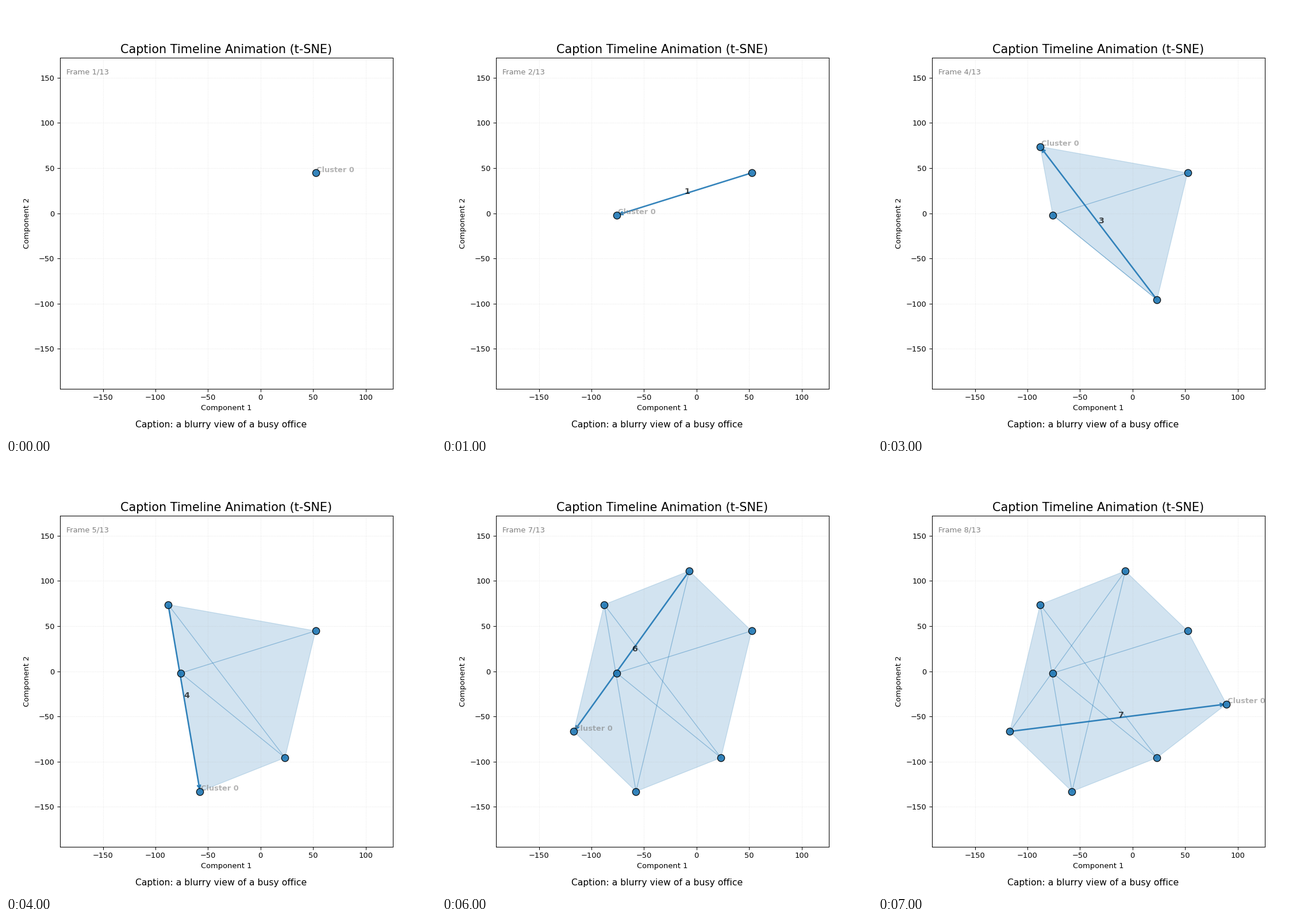
Recreate the animation shown at these times as a matplotlib script. Size 748 px wide and 748 px high, loop 8000 ms.

```python
import matplotlib.pyplot as plt
from matplotlib.animation import FuncAnimation

BLUE = "#1f77b4"
TOTAL = 13
POINTS = [
    (52.4, 44.6), (-75.9, -2.0), (23.3, -95.6), (-87.9, 73.7),
    (-57.6, -132.9), (-6.9, 110.9), (-116.8, -66.6), (89.4, -36.3),
]

plt.rcParams["font.family"] = "DejaVu Sans"
fig, ax = plt.subplots(figsize=(8, 8), dpi=93.5)
ax.set_xlim(-191.1, 126.1)
ax.set_ylim(-194, 172.1)
ax.set_title("Caption Timeline Animation (t-SNE)", fontsize=16)
ax.set_xlabel("Component 1")
ax.set_ylabel("Component 2")
ax.grid(True, linestyle=":", alpha=0.3)
fig.text(0.5, 0.02, "Caption: a blurry view of a busy office",
         ha="center", fontsize=12)
counter = ax.text(0.02, 0.95, "", transform=ax.transAxes,
                  fontsize=10, color="gray")
layer = []


def half_hull(points):
    chain = []
    for x, y in points:
        while len(chain) > 1:
            (ax0, ay0), (bx, by) = chain[-2:]
            if (bx - ax0) * (y - ay0) - (by - ay0) * (x - ax0) > 0:
                break
            chain.pop()
        chain.append((x, y))
    return chain[:-1]


def convex_hull(points):
    ordered = sorted(points)
    return half_hull(ordered) + half_hull(ordered[::-1])


def clear():
    while layer:
        layer.pop().remove()
    counter.set_text("")
    return []


def draw_arrow(start, end, label):
    layer.append(ax.annotate(
        "", xy=end, xytext=start,
        arrowprops=dict(arrowstyle="->", color=BLUE, lw=2, alpha=0.9,
                        mutation_scale=10, shrinkA=2, shrinkB=2)))
    mid_x, mid_y = ((a + b) / 2 for a, b in zip(start, end))
    layer.append(ax.text(mid_x, mid_y, label, fontsize=11, weight="bold",
                         color="black", alpha=0.7))


def update(step):
    clear()
    seen = POINTS[:step + 1]
    counter.set_text(f"Frame {step + 1}/{TOTAL}")

    if len(seen) > 2:
        layer.extend(ax.fill(*zip(*convex_hull(seen)), color=BLUE, alpha=0.2))

    # earlier moves stay as thin lines, the latest one is an arrow
    for start, end in zip(seen[:-2], seen[1:-1]):
        layer.extend(ax.plot(*zip(start, end), color=BLUE, lw=1, alpha=0.4))
    if step:
        draw_arrow(seen[-2], seen[-1], str(step))

    x, y = seen[-1]
    layer.append(ax.text(x + 1, y + 1, "Cluster 0", fontsize=10,
                         weight="bold", color="gray", alpha=0.6))
    layer.append(ax.scatter(*zip(*seen), s=90, color=BLUE, edgecolors="black",
                            linewidths=1, alpha=0.9, zorder=4))
    return layer


anim = FuncAnimation(fig, update, frames=len(POINTS), init_func=clear,
                     interval=1000, repeat=True, repeat_delay=0)
plt.show()
```
